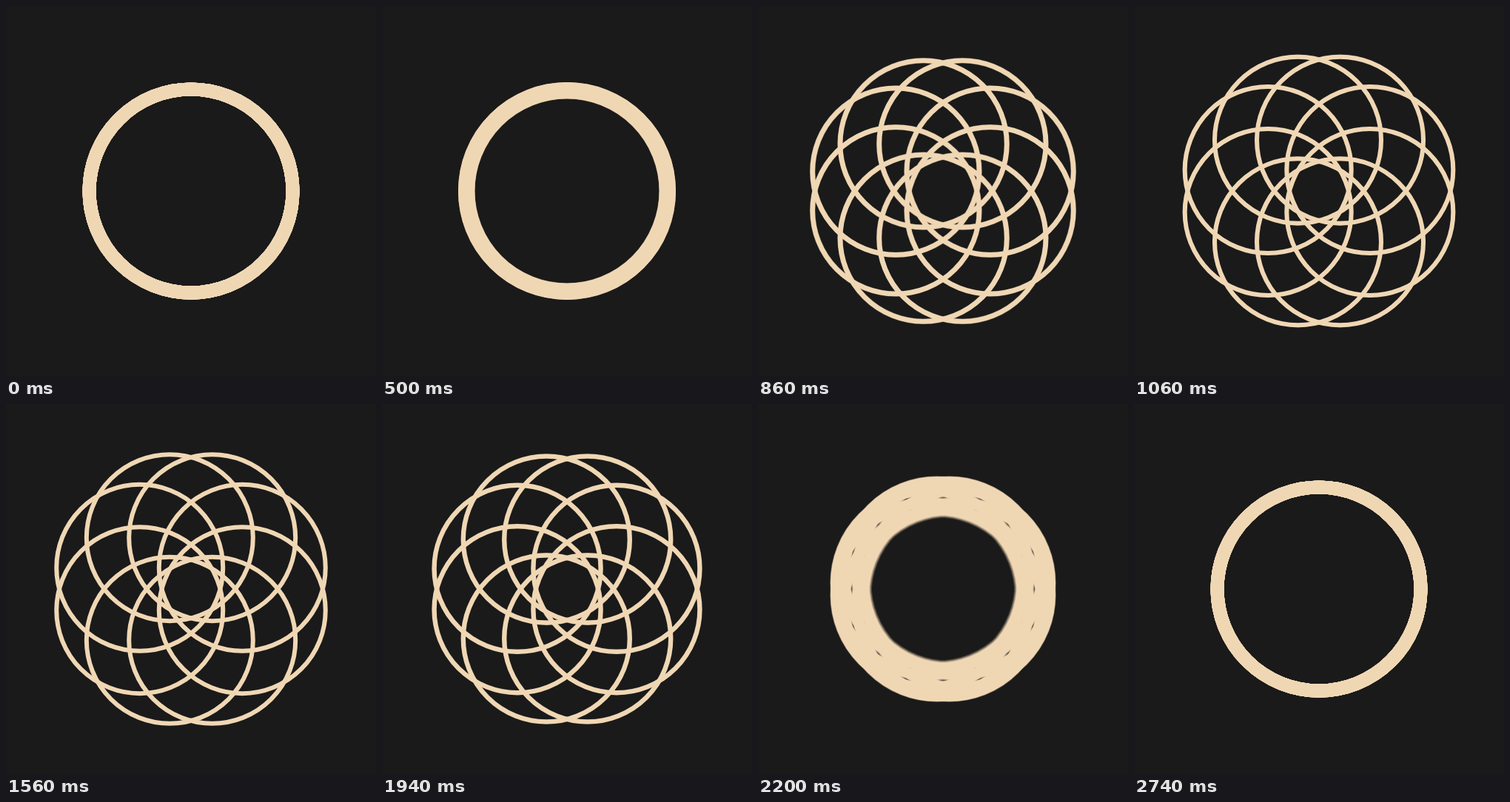
An HTML page with a canvas that plays this animation: 500 px wide and 500 px high, repeating every 2880 ms.

```html
<!DOCTYPE html>
<html lang="en">
<head>
<meta charset="utf-8">
<title>Eight rings</title>
<style>
  html, body { margin: 0; width: 100%; height: 100%; overflow: hidden; background: #1a1a1a; }
  canvas { display: block; width: 500px; height: 500px; }
</style>
</head>
<body>
<canvas id="stage" width="500" height="500"></canvas>
<script>
const SIZE = 500, RINGS = 8;
const HALF = 1440, STEP = 20, SHUTTER = 10, SAMPLES = 6;
const BACK = '#1a1a1a', CREAM = '#f0d7b4';

const stage = document.getElementById('stage').getContext('2d');
const layer = document.createElement('canvas');
layer.width = layer.height = SIZE;
const pen = layer.getContext('2d');

// Steep exponential ease, symmetric about the middle
function ease(x) {
  return x < 0.5 ? 0.5 * 2 ** (-26 * (0.5 - x)) : 1 - 0.5 * 2 ** (-26 * (x - 0.5));
}

// 0 = one ring, 1 = open rosette
function openness(ms) {
  const t = ms % (2 * HALF);
  return t < HALF ? ease(t / HALF) : 1 - ease((t - HALF) / HALF);
}

function drawRings(p) {
  const offset = 75 * p;
  const radius = 112.5 + 25 * (1 - p) ** 2;
  pen.fillStyle = BACK;
  pen.fillRect(0, 0, SIZE, SIZE);
  pen.strokeStyle = CREAM;
  pen.lineWidth = 18 - 12 * p;
  for (let i = 0; i < RINGS; i++) {
    const a = (i + 0.5) * 2 * Math.PI / RINGS;
    pen.beginPath();
    pen.arc(SIZE / 2 + offset * Math.cos(a), SIZE / 2 + offset * Math.sin(a), radius, 0, 2 * Math.PI);
    pen.stroke();
  }
}

// Average several moments for motion blur
function render(ms) {
  for (let i = 0; i < SAMPLES; i++) {
    drawRings(openness(ms + SHUTTER * i / (SAMPLES - 1)));
    stage.globalAlpha = 1 / (i + 1);
    stage.drawImage(layer, 0, 0);
  }
}

const start = performance.now();
let shown = -1;

function tick() {
  const ms = Math.floor((performance.now() - start) / STEP) * STEP % (2 * HALF);
  if (ms !== shown) render(shown = ms);
  requestAnimationFrame(tick);
}
tick();
</script>
</body>
</html>
```
